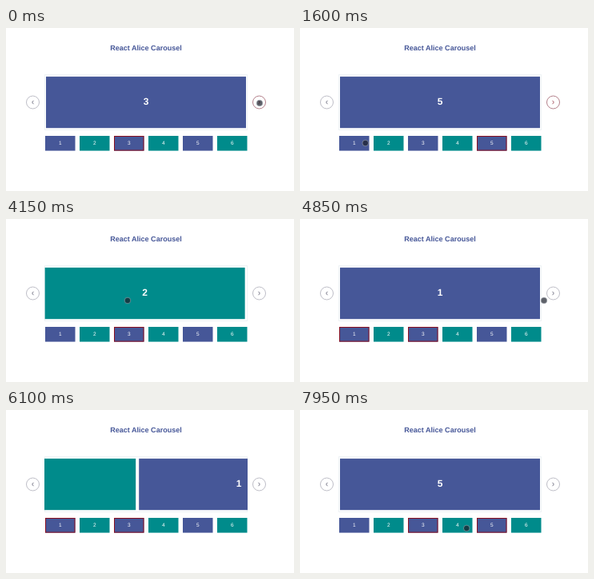
Animation, 360 px wide and 204 px high, one loop 8000 ms. Source, as an HTML page:

```html
<!DOCTYPE html>
<html lang="en">
<head>
<meta charset="utf-8">
<title>React Alice Carousel</title>
<style>
  html, body { margin: 0; width: 100%; height: 100%; overflow: hidden; background: #fff; }
  svg { display: block; width: 100vw; height: 100vh; }
  text { font-family: "Liberation Sans", Arial, sans-serif; text-anchor: middle; fill: #fff; text-rendering: geometricPrecision; }
  .title { font-size: 9.05px; font-weight: bold; fill: #465798; }
  .slide text { font-size: 12px; font-weight: bold; }
  .thumb text { font-size: 6.5px; }
  .ring { fill: none; stroke: #8b1020; visibility: hidden; }
  .on .ring { visibility: visible; }
  .frame { fill: none; stroke: #eef2f5; }
  .button { fill: none; stroke: #adadb8; stroke-width: .8; }
  .button path { stroke: #55556a; }
  .button.on { stroke: #a0606c; }
  .button.on path { stroke: #93303f; }
  .cursor { fill: rgba(25, 30, 42, .7); stroke: rgba(165, 172, 182, .7); stroke-width: .8; }
</style>
</head>
<body>
<svg viewBox="0 0 360 204">
  <clipPath id="view"><rect x="48" y="58" width="254" height="70"/></clipPath>
  <clipPath id="page"><rect width="350" height="204"/></clipPath>
  <text class="title" x="175" y="28">React Alice Carousel</text>
  <rect class="frame" x="48.5" y="58.5" width="253" height="69"/>
  <g id="slides" clip-path="url(#view)"></g>
  <g id="thumbs"></g>
  <g class="button" transform="translate(33.5 93)"><circle r="8"/><path d="M.9-2.2-.8 0 .9 2.2"/></g>
  <g class="button" id="next" transform="translate(316.5 93)"><circle r="8"/><path d="M-.9-2.2.8 0-.9 2.2"/></g>
  <g clip-path="url(#page)"><circle class="cursor" id="cursor" r="3.8"/></g>
</svg>
<script>
const LOOP = 8000, STEP = 50, PITCH = 254, CENTER = 175, COUNT = 6, GLIDE = 400;
const $ = id => document.getElementById(id);
const wrap = n => ((n - 1) % COUNT + COUNT) % COUNT + 1;
const thumbX = n => 24.75 + 43 * n;

const smooth = p => p * p * (3 - 2 * p);
const easeOut = power => p => 1 - (1 - p) ** power;

// A track holds one value over time as a chain of eased changes.
class Track {
  constructor(value) { this.value = value; this.changes = [{ start: 0, length: 0, from: value, to: value }]; }
  change(to, length = 0, ease = smooth) {
    this.changes.push({ start: clock, length, from: this.value, to, ease });
    this.value = to;
  }
  at(t) {
    const { start, length, from, to, ease } = this.changes.findLast(c => c.start <= t);
    return t >= start + length ? to : from + (to - from) * ease((t - start) / length);
  }
}

let clock = 0;
const x = new Track(317), y = new Track(94), position = new Track(3);
const active = new Track(3), focus = new Track("next");

function wait(ms) { clock += ms; }

function moveTo(toX, toY, ms) {
  x.change(toX, ms);
  y.change(toY, ms);
  wait(ms);
}

function drag(dx, ms) {
  x.change(x.value + dx, ms, easeOut(2));
  position.change(position.value - dx / PITCH, ms, easeOut(2));
  wait(ms);
}

function glideTo(n) {
  position.change(n, GLIDE, easeOut(3));
  wait(GLIDE);
  active.change(wrap(n));
}

function clickThumb(n) {
  for (const track of [position, active, focus]) track.change(n);
}

// The visitor's session
wait(200);
glideTo(4);
wait(150);
glideTo(5);
moveTo(thumbX(1) + 14, 144, 400);
wait(400);
clickThumb(1);
moveTo(thumbX(3) - 2.5, 144, 650);
wait(250);
clickThumb(3);
wait(300);
moveTo(104, 102, 300);
drag(48, 375);
glideTo(2);
wait(25);
drag(153, 200);
glideTo(1);
moveTo(261, 88, 100);
drag(-228, 350);
drag(488, 1750);
wait(50);
glideTo(-1);
moveTo(thumbX(4) + 11.5, 148, 350);

function addCard(parent, kind, n, width, top, height, baseline) {
  const left = -width / 2;
  parent.insertAdjacentHTML("beforeend",
    `<g class="${kind}">
      <rect x="${left}" y="${top}" width="${width}" height="${height}" fill="${n % 2 ? "#465798" : "#008b8b"}"/>
      <rect class="ring" x="${left + .5}" y="${top + .5}" width="${width - 1}" height="${height - 1}"/>
      <text y="${baseline}">${n}</text>
    </g>`);
  return parent.lastElementChild;
}

const place = (node, left) => node.setAttribute("transform", `translate(${left} 0)`);

const slides = [], thumbs = [];
for (let n = -2; n <= COUNT; n++) {
  slides.push({ n, node: addCard($("slides"), "slide", wrap(n), 250, 60.8, 64.4, 96.2) });
}
for (let n = 1; n <= COUNT; n++) {
  thumbs.push(addCard($("thumbs"), "thumb", n, 37.5, 135, 18.6, 146.4));
  place(thumbs.at(-1), thumbX(n));
}

function draw(t) {
  for (const { n, node } of slides) place(node, CENTER + (n - position.at(t)) * PITCH);
  const marked = [active.at(t), focus.at(t)];
  thumbs.forEach((node, i) => node.classList.toggle("on", marked.includes(i + 1)));
  $("next").classList.toggle("on", focus.at(t) === "next");
  $("cursor").setAttribute("cx", x.at(t));
  $("cursor").setAttribute("cy", y.at(t));
}

const start = performance.now();
function tick() {
  const t = (performance.now() - start) % LOOP;
  draw(Math.floor(t / STEP) * STEP);
  requestAnimationFrame(tick);
}
tick();
</script>
</body>
</html>
```
